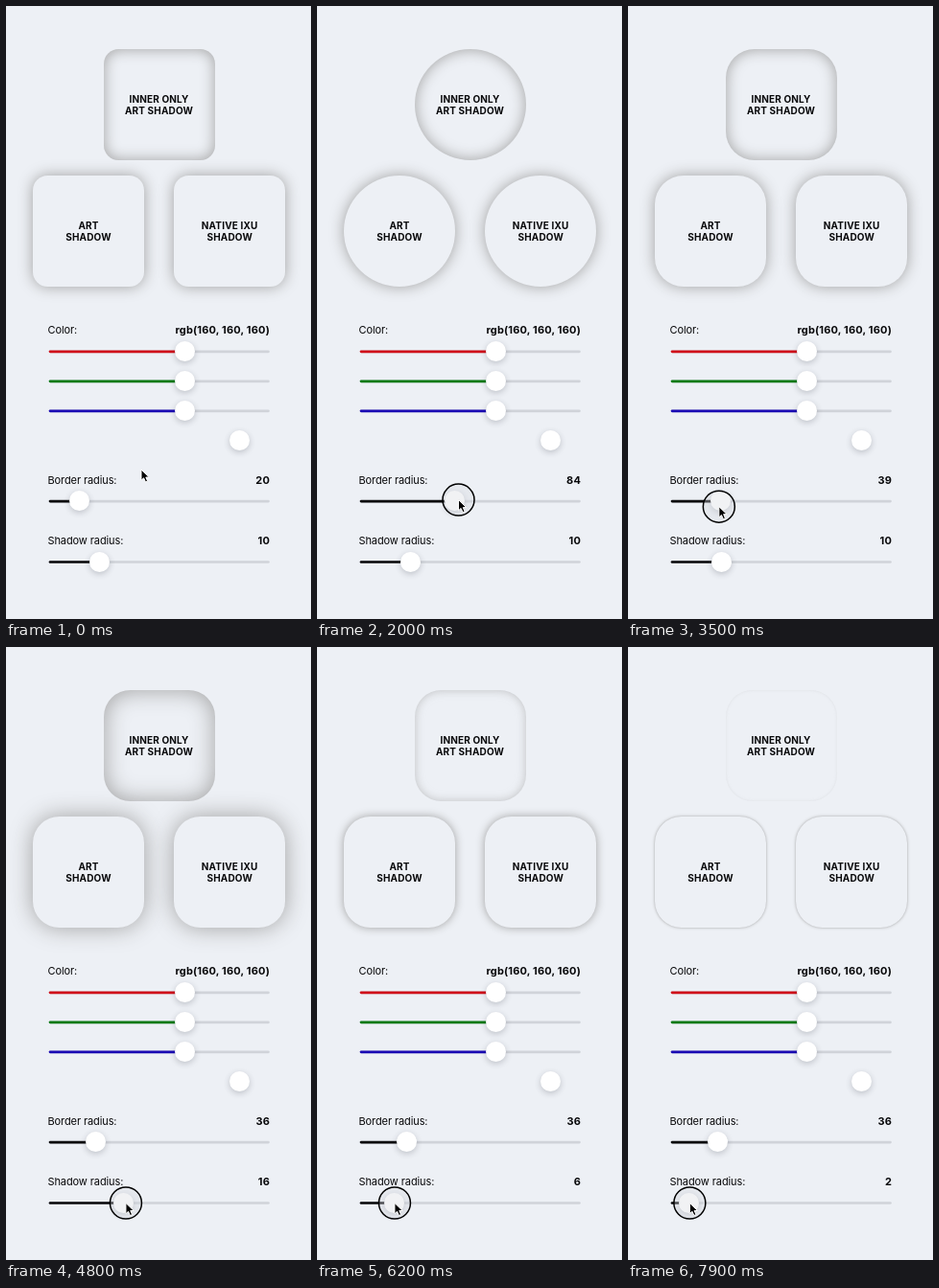
Write an HTML page that moves like this. It is 318 by 640 pixels and loops after 8000 ms.

```html
<!DOCTYPE html>
<html lang="en">
<head>
<meta charset="utf-8">
<title>Shadow playground</title>
<style>
  html, body { margin: 0; width: 100%; height: 100%; overflow: hidden; background: #edf0f5; }
  #stage { position: relative; width: 318px; height: 640px; overflow: hidden; color: #08080a;
    font-family: Inter, Roboto, sans-serif; }
  #stage > * { position: absolute; }
  .card { width: 116px; height: 116px; display: flex; align-items: center; justify-content: center;
    text-align: center; font-size: 10px; font-weight: 700; line-height: 12px; letter-spacing: .16px;
    background: #edf0f5; }
  .card div { transform: translateY(-.5px); }
  .row { left: 43.5px; width: 231.5px; height: 14px; display: flex; justify-content: space-between;
    font-size: 11px; line-height: 14px; }
  .row span { letter-spacing: -.1px; }
  .row b { font-weight: 700; letter-spacing: .17px; }
  svg { left: 0; top: 0; width: 318px; height: 640px; }
  line { stroke-width: 2.7; stroke-linecap: round; }
  .thumb { width: 21px; height: 21px; border-radius: 50%; background: #fff;
    box-shadow: 0 2px 6px rgba(40, 45, 60, .24); }
</style>
</head>
<body>
<div id="stage"></div>
<script>
const LOOP = 8000, STEP = 100, SCALE = 0.77, LAG = 30;
const BORDER_MAX = 200, SHADOW_MAX = 50;
const stage = document.getElementById('stage');

// [time, value] turning points of each drag
const borderKeys = [[700, 20], [1600, 45], [2300, 109], [2700, 109], [3600, 36]];
const shadowKeys = [[4400, 10], [5300, 24], [6200, 6], [6900, 3], [7400, 3], [7900, 2]];
const heightKeys = [[0, 484], [600, 516], [1400, 514.5], [3000, 518], [3600, 523], [4300, 580.5]];

const clamp = u => Math.max(0, Math.min(1, u));
const ease = u => u * u * (3 - 2 * u);
const mix = (a, b, u) => a + (b - a) * u;
const progress = (t, from, to) => ease(clamp((t - from) / (to - from)));
const knobX = (value, max) => 55.5 + 208.5 * value / max;

function sample(keys, t) {
  return keys.reduce((value, key, i) =>
    i ? mix(value, key[1], progress(t, keys[i - 1][0], key[0])) : key[1], 0);
}

function add(className, x, y, html = '') {
  const el = document.createElement('div');
  el.className = className;
  if (x !== null) el.style.left = x + 'px';
  el.style.top = y + 'px';
  el.innerHTML = html;
  stage.append(el);
  return el;
}

function addSvg(html) {
  stage.insertAdjacentHTML('beforeend', `<svg>${html}</svg>`);
  return stage.lastElementChild;
}

const card = (x, y, top, bottom) => add('card', x, y, `<div>${top}<br>${bottom}</div>`);
const row = (y, label, value) =>
  add('row', null, y - 7, `<span>${label}</span><b>${value}</b>`).querySelector('b');
const thumb = (x, y) => add('thumb', x - 10.5, y - 10.5);

function slider(y, color, max, value) {
  const line = stroke => `<line x1="46" x2="273.5" y1="${y + .5}" y2="${y + .5}" stroke="${stroke}"/>`;
  const fill = addSvg(line('#d0d3d9') + line(color)).lastElementChild;
  const knob = thumb(0, y);
  const set = v => {
    const x = knobX(v, max);
    fill.setAttribute('x2', x);
    knob.style.left = x - 10.5 + 'px';
  };
  set(value);
  return set;
}

const inner = card(101.5, 45, 'INNER ONLY', 'ART SHADOW');
const outer = [card(28, 177, 'ART', 'SHADOW'), card(175.2, 177, 'NATIVE IXU', 'SHADOW')];

row(338, 'Color:', 'rgb(160, 160, 160)');
['#d0101a', '#087a12', '#1a08b4'].forEach((color, i) => slider(360.3 + 31 * i, color, 255, 160));
thumb(243.7, 453);
const borderText = row(494.5, 'Border radius:', 20);
const setBorder = slider(516.6, '#08080a', BORDER_MAX, 20);
const shadowText = row(558, 'Shadow radius:', 10);
const setShadow = slider(580, '#08080a', SHADOW_MAX, 10);

const cursor = addSvg(`<g>
  <circle cx=".5" r="16.5" fill="#d8dae0" fill-opacity=".35" stroke="#000" stroke-width="1.5"/>
  <path d="M.5 0V11.2L3.1 8.8L5 13L7.1 12.1L5.3 8H8.8Z" fill="#000" stroke="#fff"
    stroke-linejoin="round"/></g>`).firstElementChild;
const ring = cursor.firstElementChild;

function cursorX(t) {
  const onBorder = knobX(sample(borderKeys, t), BORDER_MAX);
  const onShadow = knobX(sample(shadowKeys, t), SHADOW_MAX);
  const arrived = mix(140.5, onBorder, progress(t, 0, 600));
  return mix(arrived, onShadow, progress(t, 3600, 4300));
}

function draw(t) {
  const border = Math.round(sample(borderKeys, t));
  const shadow = Math.round(sample(shadowKeys, t));

  borderText.textContent = border;
  shadowText.textContent = shadow;
  setBorder(border);
  setShadow(shadow);

  const blur = shadow * 2 * SCALE;
  for (const el of [inner, ...outer]) el.style.borderRadius = Math.min(58, border * SCALE) + 'px';
  for (const el of outer) el.style.boxShadow = `0 0 ${blur}px rgb(160, 160, 160)`;
  inner.style.boxShadow = `inset 0 0 ${blur}px rgba(160, 160, 160, ${clamp(shadow / 10)})`;

  // the sliders trail the pointer slightly
  const x = t ? cursorX(t + LAG) : cursorX(0);
  cursor.setAttribute('transform', `translate(${x} ${sample(heightKeys, t)})`);
  const pressed = t >= 600 && t < 3700 || t >= 4300;
  ring.style.display = pressed ? '' : 'none';
}

const start = performance.now();
function tick() {
  const t = (performance.now() - start) % LOOP;
  draw(Math.floor(t / STEP) * STEP);
  requestAnimationFrame(tick);
}
draw(0);
requestAnimationFrame(tick);
</script>
</body>
</html>
```
